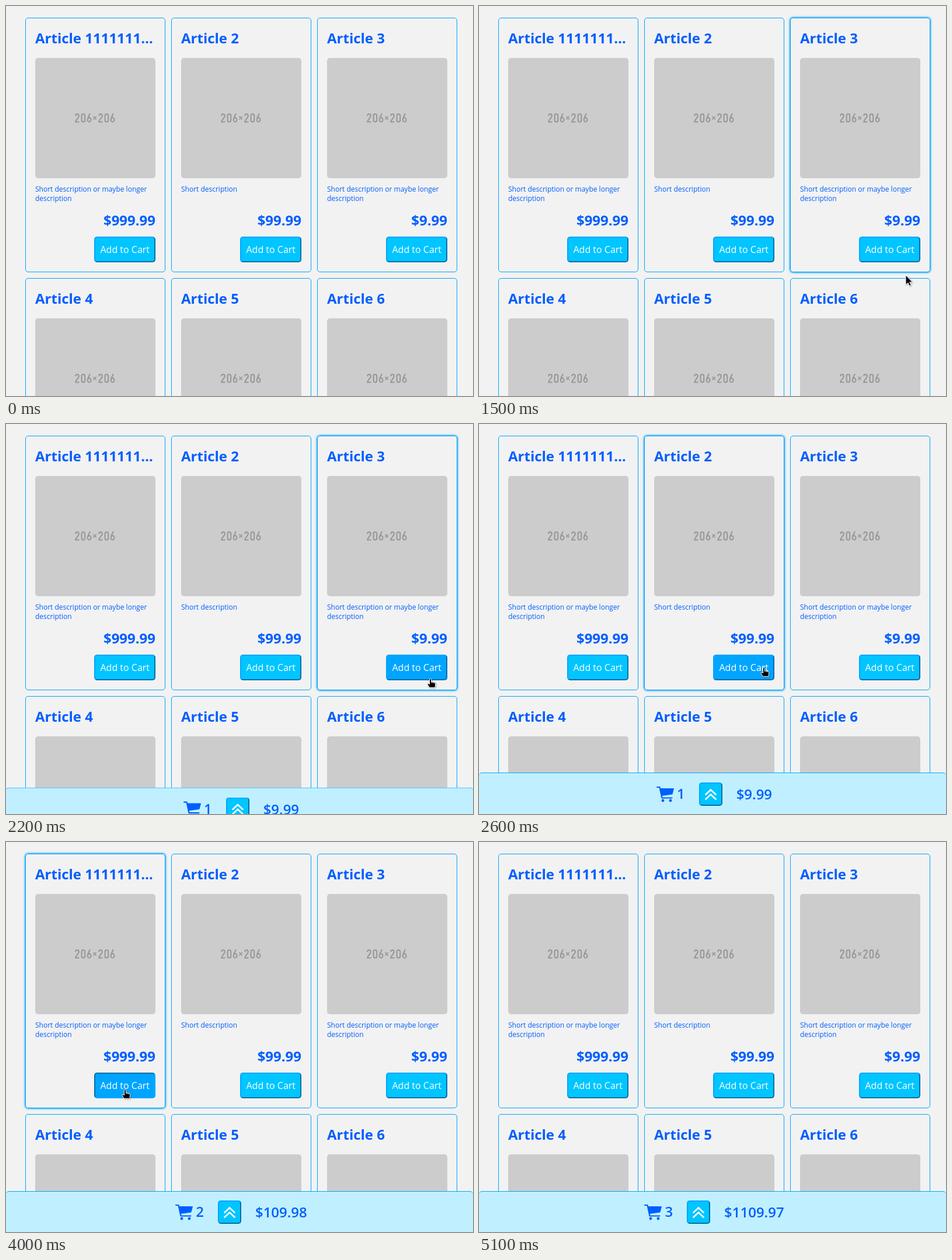
Write an HTML page that moves like this. It is 800 px wide and 668 px high and loops after 6.9 s.

```html
<!DOCTYPE html>
<html lang="en">
<head>
<meta charset="utf-8">
<title>Shopping cart</title>
<style>
* { box-sizing: border-box; }
html, body { margin: 0; width: 100%; height: 100%; overflow: hidden; }
body { position: relative; background: #f2f2f2; color: #005eff; font: 16px/1.5 "Open Sans", sans-serif; }
svg { display: block; overflow: visible; }
.card { position: absolute; width: 240px; height: 436px; border: 1px solid #00a5ff; border-radius: 5px; }
.card > * { position: absolute; right: 16px; }
.card.lit { box-shadow: 0 0 3px 1px #00a5ff; }
.title { left: 16px; top: 16px; font-size: 24px; font-weight: 700; white-space: nowrap; overflow: hidden; text-overflow: ellipsis; }
.photo { top: 68px; width: 206px; height: 206px; border-radius: 5px; background: #ccc; }
.text { left: 16px; top: 285px; font-size: 12px; line-height: 16px; }
.price { top: 328px; font-size: 24px; font-weight: 700; }
.button { background: #00c5ff; color: #fff; border: 2px solid; border-color: #00a5ff #006eaa #006eaa #00a5ff; border-radius: 5px; }
.card .button { top: 374px; padding: 8px; white-space: nowrap; }
.button.over { background: #00a5ff; }
.button.down { border-color: #006eaa #00a5ff #00a5ff #006eaa; }
#bar { position: absolute; left: 0; bottom: 0; width: 100%; background: #c0f0ff; border-top: 1px solid #00a5ff; border-radius: 5px 5px 0 0; }
#row { position: absolute; bottom: 14px; width: 100%; height: 40px; display: flex; justify-content: center; align-items: center; font-size: 24px; font-weight: 600; }
#row .cart { margin: 0 5px 0 6px; }
#row .button { width: 40px; height: 40px; margin: 0 24px; }
#count { position: relative; top: -1px; }
#cursor { position: absolute; left: 0; top: 0; filter: drop-shadow(1px 1px 1px #0005); }
#cursor path { fill: #000; stroke: #fff; stroke-linejoin: round; }
</style>
</head>
<body>
<svg width="0" height="0" style="position:absolute">
  <defs>
    <g id="size">
      <path d="M1.2 4.2C1.2 0 6.8 0 6.8 4.2C6.8 7 1.2 11.500 1.200 14.500H7.500"/>
      <rect x="11.600" y="1" width="5.600" height="13.500" rx="2.800"/>
      <path d="M26 0L22.200 8"/>
      <ellipse cx="24.600" cy="10.900" rx="2.900" ry="3.600"/>
    </g>
  </defs>
</svg>
<div id="bar">
  <div id="row">
    <svg class="cart" width="30" height="28" fill="#005eff">
      <path d="M6 4.500L29.500 4.500L27 14L8.500 16.500Z" stroke="#005eff" stroke-linejoin="round"/>
      <path d="M1 2H5.500L9.500 20.500H26.500" fill="none" stroke="#005eff" stroke-width="2.200" stroke-linecap="round" stroke-linejoin="round"/>
      <circle cx="11" cy="25" r="2.400"/><circle cx="24" cy="25" r="2.400"/>
    </svg>
    <span id="count"></span>
    <div class="button"><svg width="36" height="36" fill="none" stroke="#fff" stroke-width="2.600" stroke-linecap="round"><path d="M9.500 18.500L18 10.500L26.500 18.500M9.500 26.500L18 18.500L26.500 26.500"/></svg></div>
    <span id="total"></span>
  </div>
</div>
<svg id="cursor" width="1" height="1">
  <path id="arrow" d="M0 0V16.500L3.800 13L6.500 18.500L9.200 17.200L6.600 12H11.500Z"/>
  <g id="hand">
    <path d="M-1.500 1Q0 -1.200 1.500 1V5.500L7.500 6.800Q9 7.200 8.800 9L8 15.500H-1.500L-4.800 10.500Q-5.200 8 -3 8.500L-1.500 9.800Z"/>
    <path d="M1.500 5.500V8M4 6V8.500M6.500 6.600V8.800" stroke-width=".6"/>
  </g>
</svg>
<script>
const LOOP = 6900, STEP = 100;
const $ = id => document.getElementById(id);
const long = "Short description or maybe longer description";
const items = [
  ["Article 111111111111", long, 999.99],
  ["Article 2", "Short description", 99.99],
  ["Article 3", long, 9.99],
  ["Article 4", long, 9.99],
  ["Article 5", long, 9.99],
  ["Article 6", long, 9.99]
];
const cards = items.map(([title, text, price], i) => {
  const card = document.createElement("div");
  card.className = "card";
  card.style.left = 33 + i % 3 * 250 + "px";
  card.style.top = 20 + Math.floor(i / 3) * 446 + "px";
  card.innerHTML = `<div class="title">${title}</div>
    <svg class="photo" fill="none" stroke="#969696" stroke-width="2">
      <use href="#size" x="68" y="95"/><use href="#size" x="108" y="95"/>
      <path d="M99.500 100L104.700 105.500M104.700 100L99.500 105.500" stroke-width="1.700"/>
    </svg>
    <div class="text">${text}</div><div class="price">$${price}</div>
    <div class="button">Add to Cart</div>`;
  document.body.insertBefore(card, $("bar"));
  return card;
});

// Pointer keys: time, x, y
const path = [
  [600, 794, 592], [1000, 747, 547], [1200, 742, 538], [1300, 738, 510], [1600, 727, 436],
  [2300, 727, 436], [2500, 590, 428], [2600, 488, 417], [2900, 462, 417], [3200, 460, 417],
  [3400, 345, 421], [3500, 278, 423], [3600, 225, 425], [3700, 205, 425], [3800, 204, 424],
  [4600, 204, 424], [4700, 209, 427], [4800, 330, 400], [5000, 690, 330], [5100, 690, 330]
];
// Clicks: press time, count shown from, item index
const clicks = [[1900, 2100, 2], [3100, 3200, 1], [4000, 4100, 0]];

function pointer(t) {
  const i = path.findIndex(key => key[0] > t);
  if (i < 1) return null;
  const [t0, x0, y0] = path[i - 1], [t1, x1, y1] = path[i];
  const k = (t - t0) / (t1 - t0);
  return { x: x0 + (x1 - x0) * k, y: y0 + (y1 - y0) * k };
}

function draw(t) {
  const p = pointer(t);
  let hovered = -1, onButton = false;
  if (p && p.x < 775) {
    const col = Math.floor((p.x - 25) / 250), row = Math.floor((p.y - 15) / 446);
    const dx = p.x - 33 - col * 250, dy = p.y - 20 - row * 446;
    hovered = row * 3 + col;
    onButton = dx > 118 && dx < 223 && dy > 375 && dy < 419;
  }
  const pressed = clicks.some(c => c[0] === t);
  cards.forEach((card, i) => {
    const button = card.lastElementChild, over = i === hovered && onButton;
    card.classList.toggle("lit", i === hovered);
    button.classList.toggle("over", over);
    button.classList.toggle("down", over && pressed);
  });

  const added = clicks.filter(c => t >= c[1]);
  const rise = Math.min(1, Math.max(0, (t - 2000) / 500));
  $("bar").style.display = added.length ? "" : "none";
  $("bar").style.height = (t < 2700 ? 71 : 70) + "px";
  $("bar").style.transform = `translateY(${71 * (1 - rise) ** 2}px)`;
  $("count").textContent = added.length;
  $("total").textContent = "$" + added.reduce((sum, c) => sum + items[c[2]][2], 0).toFixed(2);

  $("cursor").style.display = p ? "" : "none";
  if (p) $("cursor").style.transform = `translate(${Math.round(p.x)}px,${Math.round(p.y)}px)`;
  $("hand").style.display = onButton ? "" : "none";
  $("arrow").style.display = onButton ? "none" : "";
}

function tick() {
  draw(Math.floor(performance.now() % LOOP / STEP) * STEP);
  requestAnimationFrame(tick);
}
tick();
</script>
</body>
</html>
```
